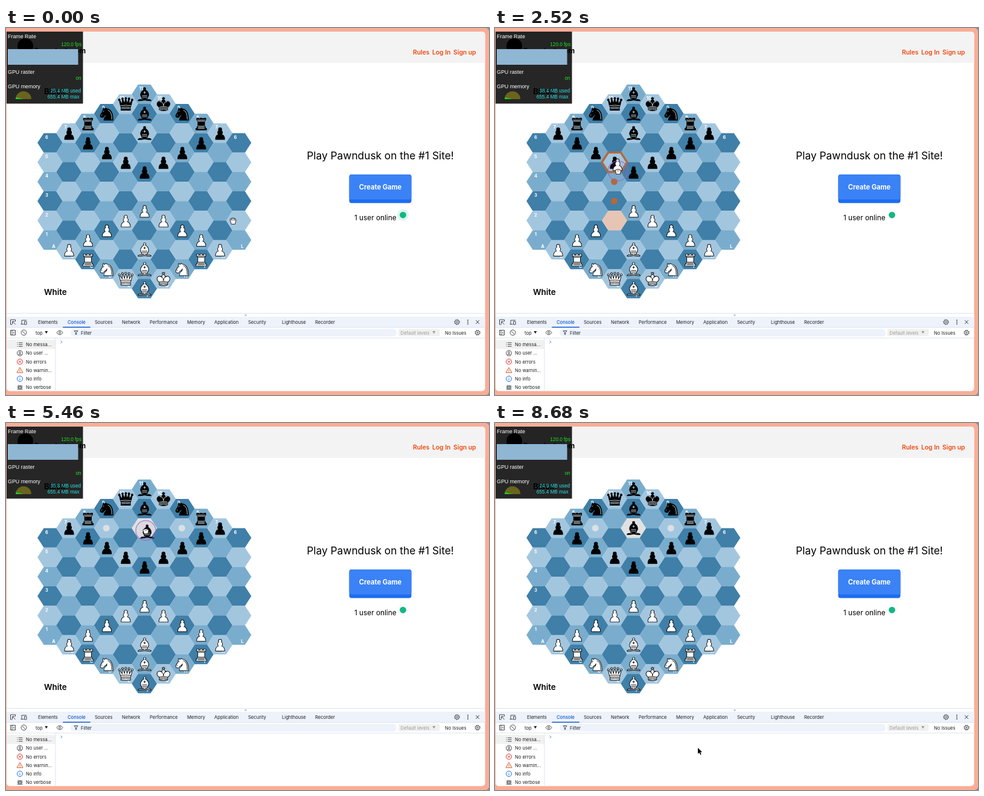
An HTML page that plays this animation: 800 px wide and 609 px high, repeating every 8750 ms.

```html
<!DOCTYPE html>
<html lang="en">
<head>
<meta charset="utf-8">
<title>Hexagonal chess</title>
<style>
html, body { margin: 0; width: 100%; height: 100%; overflow: hidden; background: #8f8b98; }
svg { display: block; width: 800px; height: 609px; font-family: Inter, Roboto, sans-serif; }
.hud { font-family: "Liberation Sans", Arial, sans-serif; }
</style>
</head>
<body>
<svg id="stage" viewBox="0 0 800 609"></svg>
<script>
const LOOP = 8750;
const stage = document.getElementById('stage');

const text = (x, y, s, size, fill = '#1f2023', weight = 400, anchor = 'start', more = '') =>
  `<text x="${x}" y="${y}" font-size="${size}" fill="${fill}" font-weight="${weight}" text-anchor="${anchor}" ${more}>${s}</text>`;
const rect = (x, y, w, h, fill, rx = 0) =>
  `<rect x="${x}" y="${y}" width="${w}" height="${h}" rx="${rx}" fill="${fill}"/>`;
const circle = (x, y, r, fill, more = '') => `<circle cx="${x}" cy="${y}" r="${r}" fill="${fill}" ${more}/>`;
const icon = (x, y, d, stroke = '#45484c') =>
  `<path transform="translate(${x} ${y})" d="${d}" fill="none" stroke="${stroke}"/>`;

// Path parts: a disc, and a polygon mirrored from its right half.
const disc = (x, y, r) => `M${x - r} ${y}a${r} ${r} 0 1 1 ${2 * r} 0a${r} ${r} 0 1 1 ${-2 * r} 0z`;
const mirrored = (...half) =>
  'M' + [...half, ...half.map(([x, y]) => [-x, y]).reverse()].join('L') + 'z';
const bands = (w, bend, ...ys) => ys.map(y => `M${-w} ${y}Q0 ${y - bend} ${w} ${y}`).join('');

// Board: c is the column from the centre, r counts half rows from the top.
const cx = c => 229.2 + 31.25 * c, cy = r => 110 + 16.12 * r;
const cells = [];
for (let c = -5; c <= 5; c++)
  for (let r = Math.abs(c); r <= 20 - Math.abs(c); r += 2) cells.push({ c, r });
const hexPath = mirrored([10.4, -16.2], [20.9, 0], [10.4, 16.2]);
const hex = (c, r, attrs) => `<path transform="translate(${cx(c)} ${cy(r)})" d="${hexPath}" ${attrs}/>`;
const nearest = (x, y) => cells.reduce((best, p) => {
  const d = Math.hypot(cx(p.c) - x, cy(p.r) - y);
  return d < best.d ? { ...p, d } : best;
}, { d: Infinity });

// Each piece: overlapping body parts, then inner lines.
const shapes = {
  P: [disc(0, -9.5, 3.5) + disc(0, -1.5, 5.5) + 'M-11 15.5C-11 6-5 3 0 3S11 6 11 15.5z', ''],
  B: [disc(0, -14.5, 2.2) + 'M-7 7C-12 3-10-7 0-12C10-7 12 3 7 7L7 10Q0 12-7 10z' +
    'M-13 14Q-2 15 0 11Q2 15 13 14L16 16Q8 16 0 14Q-8 16-16 16z',
    'M0-7v5M-2.5-4.5h5' + bands(6, 0, 3.5, 7.5)],
  R: [mirrored([2.2, -13], [2.2, -11], [7, -11], [7, -13], [11, -13], [11, -9], [8, -6],
    [8, 7], [10, 9], [10, 13], [13, 13], [13, 16]), bands(8, 0, -5.5, 7, 10, 13) + bands(10, 0, -8.5)],
  N: ['M-7 16C-7 6 2 8 .5-2Q-2 3-7 5Q-9 10-12 9Q-17 9-16 4L-10-6L-9-14L-6-11L-3-14L0-12Q15-10 15 16z',
    'M-13 3v1M-8-7l-.6 1.2M3-9Q13-6 12.5 14'],
  Q: [[-2, -1, 0, 1, 2].map(i => disc(8.2 * i, -14.5 + i * i, 1.7)).join('') +
    mirrored([0, -13], [3, 1], [8, -12], [8.5, 2], [16, -9], [13, 4], [11, 9], [11.5, 15.5]),
    bands(13, 2, 4) + bands(10.5, 2, 8.5, 12)],
  K: [mirrored([.5, -16], [.5, -15], [2.5, -15], [2.5, -14], [.5, -14], [.5, -9]) +
    'M0 3C-5-6-4-10 0-10S5-6 0 3z' +
    'M-10 15V8C-20 2-15-7-9-6Q-2-6 0 3Q2-6 9-6C15-7 20 2 10 8V15Q0 18-10 15z',
    'M-9-6Q-2-6 0 3Q2-6 9-6M0 3V6' + bands(10, 4, 8, 11.5, 15)]
};
const piece = (kind, white, x, y) => {
  const [body, lines] = shapes[kind];
  return `<g transform="translate(${x + .4} ${y}) scale(.65)" stroke-linejoin="round">
    <path d="${body}" fill="${white ? '#fff' : '#000'}" stroke="#000" stroke-width="2.8" paint-order="stroke"/>
    <path d="${lines}" fill="none" stroke="${white ? '#000' : '#d8e4ec'}" stroke-width="1.4" stroke-linecap="round"/></g>`;
};

const men = [];
const addPair = (kind, c, r) => men.push({ kind, c, r, white: false }, { kind, c, r: 20 - r, white: true });
for (let c = -4; c <= 4; c++) addPair('P', c, 8 - Math.abs(c));
[0, 2, 4].forEach(r => addPair('B', 0, r));
addPair('Q', -1, 1);
addPair('K', 1, 1);
[-1, 1].forEach(s => { addPair('N', 2 * s, 2); addPair('R', 3 * s, 3); });

function board() {
  const tones = ['#7aadcd', '#a3c6df', '#3f7fa8'];
  let out = cells.map(({ c, r }) => hex(c, r, `fill="${tones[r % 3]}"`)).join('');
  const label = (x, y, s) => text(x, y, s, 7.5, '#fff', 700, 'middle');
  const number = (c, r, n) => label(cx(c) - 5.5, cy(r) - 7, n);
  for (let c = -5; c <= 5; c++) {
    const a = Math.abs(c);
    out += number(c, a, 11 - a) + label(cx(c) + 6, cy(20 - a) + 13.5, 'ABCDEFGHIKL'[c + 5]);
  }
  for (let n = 1; n < 6; n++) out += number(-5, 17 - 2 * n, n);
  return out;
}

function page() {
  const link = (x, s) => text(x, 44, s, 10.3, '#f0480f', 600);
  return rect(-20, 0, 820, 609, '#f9ad97', 6) + rect(1, 6, 792.5, 596.5, '#fff', 5) +
    rect(1, 6, 792.5, 20, '#f3f3f3', 5) + rect(1, 12, 792.5, 46, '#f3f3f3') +
    circle(32, 30, 13, '#000') + text(132, 42, 'Pawndusk.com', 11.3, '#000', 700, 'end') +
    text(63, 110, 'Black', 13.3, '#000', 600) + text(63, 443, 'White', 13.3, '#000', 600) +
    link(674, 'Rules') + link(706, 'Log In') + link(741, 'Sign up') +
    text(620, 217.5, 'Play Pawndusk on the #1 Site!', 17.3, '#000', 400, 'middle') +
    rect(568.5, 243, 103, 47.5, '#1c6cf2', 4) + rect(568.5, 243, 103, 41.5, '#3b82f6', 4) +
    text(620, 267.5, 'Create Game', 11.1, '#fff', 700, 'middle') +
    text(577, 318.5, '1 user online', 11.8, '#000');
}

function hud() {
  const title = (y, s) => text(3, y, s, 8.9, '#fff');
  const value = (x, y, s, fill, more) => text(x, y, s, 8.2, fill, 400, 'end', more);
  return '<g class="hud">' + rect(1, 6, 126.5, 119.5, 'rgba(0,0,0,.85)') +
    title(17, 'Frame Rate') + value(125, 30, '120.0 fps', '#1ee61e') + rect(3, 35, 116.5, 26, '#8fb6d3') +
    title(75.5, 'GPU raster') + value(124.5, 86, 'on', '#1ee61e') + title(99.5, 'GPU memory') +
    '<path d="M16 118a13 13 0 0 1 26 0z" fill="#69651d"/><path d="M16 118q0-2 .5-3L29 118z" fill="#18d818"/>' +
    value(124, 107, '', '#27e3e8', 'id="used"') + value(121.5, 117, '655.4 MB max', '#27e3e8') + '</g>';
}

function devtools() {
  const ring = disc(0, 0, 4.5);
  const gear = (x, y) => icon(x, y, disc(0, 0, 3.3) + disc(0, 0, 1)) +
    circle(x, y, 4.3, 'none', 'stroke="#45484c" stroke-dasharray="1.7"');
  const line = y => rect(1, y, 792.5, .8, '#d5deee');
  const tabs = { Elements: 53, Console: 102, Sources: 147, Network: 192, Performance: 238, Memory: 300,
    Application: 345, Security: 401, Lighthouse: 457, Recorder: 512 };
  let out = line(473) + rect(1, 479, 792.5, 18, '#edf2fb') + line(496.5) + line(514) + circle(397, 476.5, 1.7, '#c4c6c9');
  for (const name in tabs)
    out += text(tabs[name], 491, name, 7.6, ...(name === 'Console' ? ['#0b57d0', 500] : []));
  out += rect(94, 495.7, 46, 1.6, '#0b57d0', 1) +
    icon(11.5, 488, 'M-1 4h-3v-8h8v3M-1-1l5 5M-1 3v-4h4') +
    icon(29.5, 488, 'M-5 3.5h5M-3.5 3v-6h8M1-1h3.5v5h-3.5z') + gear(747, 488) +
    [485, 488, 491].map(y => circle(765, y, 1, '#45484c')).join('') +
    icon(781, 488, 'M-3-3l6 6M3-3l-6 6') +
    icon(11.5, 505.5, 'M-4-4h8v8h-8zM-1.5-4v8M2.5-1.5l-2 1.5 2 1.5') + icon(29.5, 505.5, ring + 'M-3-3l6 6') +
    text(49, 508.5, 'top', 7.6) + text(64, 508, '▼', 5.5) +
    icon(89, 505.5, 'M-5 0q5-7 10 0q-5 7-10 0' + disc(0, 0, 1.5)) +
    rect(107, 499.5, 540, 12.5, '#edf2fb', 6) + icon(116, 505.5, 'M-3-3h6l-2.3 3v3h-1.4v-3z') +
    text(124, 508.5, 'Filter', 7.6) + rect(650, 499.5, 68.5, 12, '#f0f0f0', 2) +
    text(653.5, 508.5, 'Default levels', 7.5, '#9a9a9a') + text(706, 508, '▼', 5.5, '#9a9a9a') +
    text(727, 508.5, 'No Issues', 7.6) + gear(781, 505.5) +
    rect(1, 517.5, 80.5, 15, '#f1f1f1') + rect(81.5, 514, .8, 88, '#d5deee') +
    icon(92, 521, 'M-1.5-2l2.5 2-2.5 2', '#5a8fe8');
  const rows = [
    ['No messa...', [-3, 0, 3].map(y => `M-4.5 ${y}h1M-2 ${y}h6.5`).join('')],
    ['No user ...', ring + disc(0, -1, 1.5) + 'M-3 3q3-2.5 6 0'],
    ['No errors', ring + 'M-2-2l4 4M2-2l-4 4', '#dc362e'],
    ['No warnin...', 'M0-4.5l5 8.5h-10zM0-1v2.5M0 2.3v1', '#d9541e'],
    ['No info', ring + 'M0-2.5v1M0-.5v3', '#1a6ee8'],
    ['No verbose', disc(0, .5, 2.5) + [-2, .5, 3].map(y => `M-4.5 ${y}h9`).join('') + 'M-2-4l1 2M2-4l-1 2']
  ];
  rows.forEach(([label, d, color], i) => {
    const y = 525.3 + 14.2 * i;
    out += icon(23, y, d, color) + text(33, y + 2.8, label, 7.6);
  });
  return out;
}

stage.innerHTML = page() + board() + '<g id="play"></g>' + devtools() + hud() +
  '<g id="pulse"></g>' + circle(657.5, 310.3, 5.4, '#14b684') + '<g id="pointer"></g>';
const [used, play, pulse, pointer] = ['used', 'play', 'pulse', 'pointer'].map(id => document.getElementById(id));

// Turning points of the pointer: time, x, y.
const path = [
  [200, 376, 320], [1000, 201, 323], [1250, 201, 323], [2300, 206, 261], [2700, 200, 198],
  [3200, 229, 240], [3600, 240, 195], [3850, 311, 213], [4500, 269, 261], [4750, 269, 261],
  [5300, 229, 176], [6000, 248, 195], [6400, 254, 178], [7450, 230, 174], [8300, 336, 539]
];
function at(t) {
  const i = path.findIndex(k => k[0] > t);
  const b = path.at(i), a = path[Math.max(0, i - 1)];
  if (i <= 0) return b.slice(1);
  const f = (t - a[0]) / (b[0] - a[0]);
  return [a[1] + (b[1] - a[1]) * f, a[2] + (b[2] - a[2]) * f];
}

const warm = { fill: '#e7c5b4', dot: '#b2693c' }, pale = { fill: '#e0e1e2', dot: '#dbe0e4' };
const drags = [
  { down: 1050, up: 2730, c: -1, r: 13, dots: [[-1, 11], [-1, 9]], look: warm },
  { down: 3200, up: 4540, c: 0, r: 8, dots: [[0, 10]], look: pale },
  { down: 5320, up: 7450, c: 0, r: 4, dots: [[-2, 4], [2, 4]], look: pale }
];
const memory = [[0, 25.4], [1900, 38.4], [3000, 25.9], [4200, 31.3], [5400, 35.8], [7200, 24.9]];
const fingers = [-3, -1, 1, 3];
const palm = 'M-4 0H4.5L3 5H-2.500z';
const cursors = {
  arrow: ['M0 0v10l2.3-2.2 1.7 3.8 1.7-.7-1.7-3.7h3.2z', '#000', '#fff'],
  open: [fingers.map(x => disc(x * 1.2, x * x / 5 - 4, .8) + `M${x * 1.2 - .8} ${x * x / 5 - 4}h1.6L${x + .8} 1h-1.6z`).join('') + palm, '#fff', '#000'],
  closed: [fingers.map(x => disc(x, x * x / 10 - 1.5, 1.1)).join('') + palm, '#fff', '#000']
};

function draw(t) {
  const drag = drags.filter(d => d.down <= t).pop();
  const held = drag && t < drag.up;
  const [px, py] = at(t), [mx, my] = at(t - 70); // the cursor trails the piece
  const taken = m => held && m.c === drag.c && m.r === drag.r;
  let out = '';
  if (drag) {
    const { c, r, dots, look } = drag;
    out += hex(c, r, `fill="${look.fill}"`) + dots.map(([c, r]) => circle(cx(c) - .5, cy(r), 5.5, look.dot)).join('');
    const over = nearest(px, py);
    if (held && !taken(over)) out += hex(over.c, over.r, `fill="none" stroke="${look.dot}" stroke-width="3.4"`);
  }
  out += men.filter(m => !taken(m)).map(m => piece(m.kind, m.white, cx(m.c), cy(m.r))).join('');
  out += men.filter(taken).map(m => piece(m.kind, m.white, px, py)).join('');
  play.innerHTML = out;

  let ring = '';
  if (drag && t < drag.up + 250) {
    const fade = Math.max(0, (t - drag.up) / 250);
    ring = circle(mx, my, 16.5 + 8 * fade, '#a070c8',
      `fill-opacity=".08" stroke="#9565c0" stroke-opacity=".75" stroke-width="1.3" opacity="${1 - fade}"`);
  }
  const kind = held ? 'closed' : nearest(mx, my).d < 20 ? 'open' : 'arrow';
  const [d, fill, stroke] = cursors[kind];
  pointer.innerHTML = ring + `<path transform="translate(${mx} ${my})" d="${d}" fill="${fill}"
    stroke="${stroke}" stroke-width="1.5" stroke-linejoin="round" paint-order="stroke"/>`;

  const p = Math.min(1, (t / 1050 + .32) % 1 / .75), ease = 1 - (1 - p) ** 2.6;
  pulse.innerHTML = circle(657.5, 310.3, 5.4 * (1 + ease), '#34d399', `opacity="${.75 * (1 - ease)}"`);
  used.textContent = memory.filter(m => m[0] <= t).pop()[1].toFixed(1) + ' MB used';
}

const start = performance.now();
function tick() {
  draw((performance.now() - start) % LOOP);
  requestAnimationFrame(tick);
}
tick();
</script>
</body>
</html>
```
